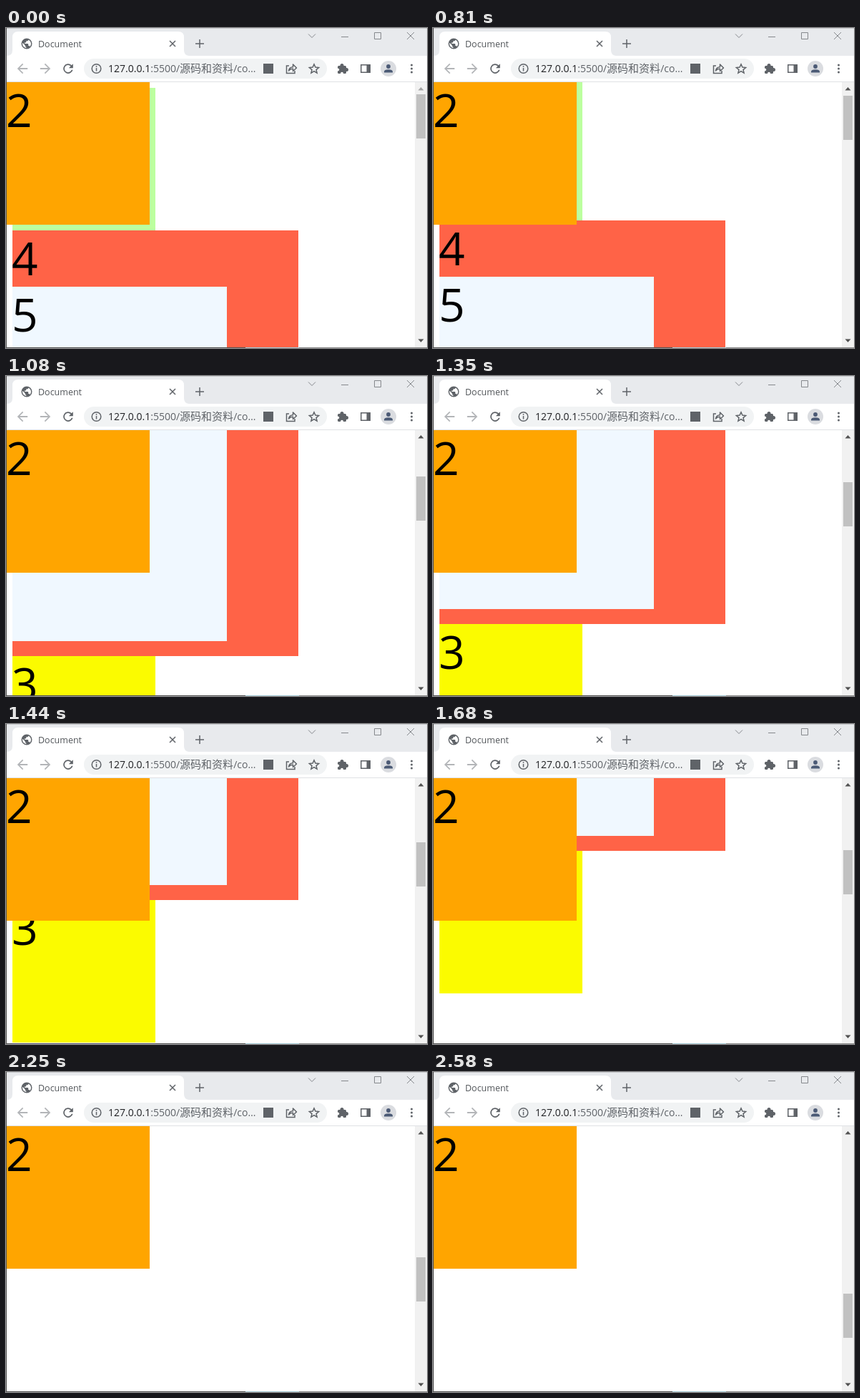
An HTML page for the animation above (3.24 s loop, 589x449 px).

```html
<!DOCTYPE html>
<html lang="en">
<head>
<meta charset="utf-8">
<title>Fixed box in a scrolling page</title>
<style>
  html, body { margin: 0; width: 100%; height: 100%; overflow: hidden; background: #fff; }
  svg { display: block; width: 589px; height: 449px; }
  rect { shape-rendering: crispEdges; }
  .soft { shape-rendering: auto; }
  text { font-family: "Open Sans", "Noto Sans", "Noto Sans CJK SC", sans-serif; white-space: pre; }
  .digit { font-size: 64px; }
  .line { fill: none; stroke: #5f6368; stroke-width: 1.5; }
  .thin { fill: none; stroke: #85888c; stroke-width: 1; }
  .icon { fill: #5f6368; }
</style>
</head>
<body>
<svg viewBox="0 0 589 449">
  <defs>
    <clipPath id="view"><rect x="1" y="76" width="571" height="372"/></clipPath>
    <path id="arrow" d="M20 11H7.8l5.6-5.6L12 4l-8 8 8 8 1.4-1.4L7.8 13H20z"/>
  </defs>

  <!-- page -->
  <rect width="589" height="449" fill="#fff"/>
  <g clip-path="url(#view)">
    <g id="page">
      <rect x="9" y="84" width="200" height="200" fill="#bcff9f"/>
      <rect x="9" y="284" width="400" height="400" fill="#ff6347"/>
      <text class="digit" x="8" y="347">4</text>
      <rect x="9" y="363" width="300" height="300" fill="#f0f8ff"/>
      <text class="digit" x="8" y="426">5</text>
      <rect x="9" y="684" width="200" height="200" fill="#fbfb00"/>
      <text class="digit" x="8" y="747">3</text>
    </g>
    <rect x="1" y="76" width="200" height="200" fill="#ffa500"/>
    <text class="digit" x="0" y="139">2</text>
  </g>

  <!-- scrollbar -->
  <rect x="572" y="76" width="17" height="372" fill="#f1f1f1"/>
  <path id="up" d="M576.5 87.5h8l-4-4.5z"/>
  <path d="M576.5 436.5h8l-4 4.5z" fill="#505050"/>
  <rect id="thumb" x="574" y="93" width="13" height="62" fill="#c1c1c1"/>

  <!-- tab strip -->
  <rect width="589" height="39" fill="#e8eaed"/>
  <path d="M1 39q8 0 8-8V13q0-8 8-8h224q8 0 8 8v18q0 8 8 8z" fill="#fff"/>
  <path class="icon" transform="translate(20 13) scale(.75)" d="M12 2a10 10 0 1 0 0 20 10 10 0 0 0 0-20zm-1 17.9c-4-.5-7-3.8-7-7.9 0-.6.1-1.2.2-1.8L9 15v1c0 1.100.9 2 2 2zm6.900-2.500c-.3-.8-1-1.400-1.900-1.400h-1v-3c0-.6-.4-1-1-1H8v-2h2c.6 0 1-.4 1-1V7h2c1.100 0 2-.9 2-2v-.4c2.900 1.200 5 4.100 5 7.400 0 2.100-.8 4-2.100 5.400z"/>
  <text x="45" y="27" font-size="12.5" fill="#505458">Document</text>
  <path class="line" d="M229 18l8 8m0-8l-8 8"/>
  <path class="line" stroke-width="2" d="M271 16v12m-6-6h12"/>
  <path class="thin" d="M423 8.500l5 5 5-5M469 12.500h10M515.500 6.500h9v9h-9zM561 6l10 10m0-10l-10 10"/>

  <!-- toolbar -->
  <rect y="39" width="589" height="36" fill="#fff"/>
  <rect y="75" width="589" height="1" fill="#dfe1e4"/>
  <use href="#arrow" transform="translate(12.200 46.200) scale(.9)" fill="#b3b5b8"/>
  <use href="#arrow" transform="translate(65.800 46.200) scale(-.9 .9)" fill="#b3b5b8"/>
  <path class="icon" transform="translate(76.800 46.800) scale(.85)" d="M17.600 6.400A8 8 0 1 0 19.700 14h-2.100A6 6 0 1 1 16.200 7.800L13 11h7V4z"/>
  <rect class="soft" x="109" y="43" width="340" height="28" rx="14" fill="#f1f3f4"/>
  <circle class="line" cx="126.500" cy="57" r="6.300"/>
  <path class="line" d="M126.500 56v4.500m0-7.500v1.700"/>
  <text x="143" y="62" font-size="14" fill="#5f6368"><tspan fill="#202124">127.0.0.1</tspan>:5500/<tspan font-size="15">源码和资料</tspan>/co…</text>
  <rect x="360" y="50" width="14" height="14" fill="#5f6368"/>
  <path class="line" stroke-width="1.300" d="M396 53h-3.500v10.500h11.500V60"/>
  <path class="line" stroke-width="1.300" stroke-linejoin="round" d="M395.500 60q1-5 6-5.200V51l5 5-5 4.500v-3.300q-4 0-6 2.800z"/>
  <path class="line" d="M431 50.800l1.900 4.300 4.700.4-3.600 3.100 1.100 4.600-4.100-2.500-4.100 2.500 1.100-4.600-3.600-3.100 4.700-.4z"/>
  <g class="icon">
    <rect class="soft" x="464" y="53" width="12" height="11" rx="1.500"/>
    <circle cx="470" cy="52.500" r="2.500"/>
    <circle cx="476.500" cy="58.500" r="2.500"/>
    <g fill="#fff"><circle cx="464.200" cy="58.500" r="2"/><circle cx="470" cy="63.800" r="2"/></g>
    <path fill-rule="evenodd" d="M496 51h14v12h-14zm1.500 1.500v9h7v-9z"/>
    <circle cx="567.500" cy="52" r="1.500"/>
    <circle cx="567.500" cy="57" r="1.500"/>
    <circle cx="567.500" cy="62" r="1.500"/>
  </g>
  <circle cx="535" cy="57" r="11" fill="#dadce0"/>
  <g fill="#4b5a75"><circle cx="535" cy="54" r="2.900"/><path d="M529 62.500v-1.300q0-3 6-3t6 3v1.300z"/></g>

  <!-- window edges -->
  <rect width="589" height="1" fill="#c9cbce"/>
  <rect width="1" height="449" fill="#555"/>
  <rect y="448" width="589" height="1" fill="#555"/>
  <rect x="335" y="448" width="75" height="1" fill="#a5cbd6"/>
  <rect x="410" y="448" width="179" height="1" fill="#8c8c8c"/>
</svg>

<script>
const LOOP = 3240, STEP = 30;

// [time in ms, scroll offset in px]: five flicks of the wheel with rests between
const keys = [
  [0, 0], [780, 0], [810, 14], [960, 171], [1110, 300],
  [1260, 300], [1350, 336], [1470, 467], [1530, 500],
  [1650, 500], [1680, 506], [1770, 650], [1890, 800],
  [1980, 800], [2070, 836], [2190, 967], [2250, 1000],
  [2310, 1000], [2445, 1150], [2580, 1300], [LOOP, 1300]
];

const slope = i => (keys[i + 1][1] - keys[i][1]) / (keys[i + 1][0] - keys[i][0]);

// Harmonic mean of the neighbouring slopes keeps the curve monotone
const tangent = i => {
  if (i === 0 || i === keys.length - 1) return 0;
  const a = slope(i - 1), b = slope(i);
  return a * b > 0 ? 2 * a * b / (a + b) : 0;
};

function scrollAt(t) {
  let i = 0;
  while (t >= keys[i + 1][0]) i++;
  const [t0, y0] = keys[i], [t1, y1] = keys[i + 1];
  const h = t1 - t0, u = (t - t0) / h, v = 1 - u;
  return y0 * v * v * (1 + 2 * u) + y1 * u * u * (3 - 2 * u)
    + h * u * v * (tangent(i) * v - tangent(i + 1) * u);
}

const page = document.getElementById('page');
const thumb = document.getElementById('thumb');
const up = document.getElementById('up');
const start = performance.now();

function draw() {
  const t = (performance.now() - start) % LOOP;
  const y = Math.round(scrollAt(Math.floor(t / STEP) * STEP));
  page.setAttribute('transform', `translate(0 ${-y})`);
  thumb.setAttribute('y', 93 + Math.floor(y * 0.1679));
  up.setAttribute('fill', y ? '#505050' : '#a3a3a3');
  requestAnimationFrame(draw);
}
draw();
</script>
</body>
</html>
```
